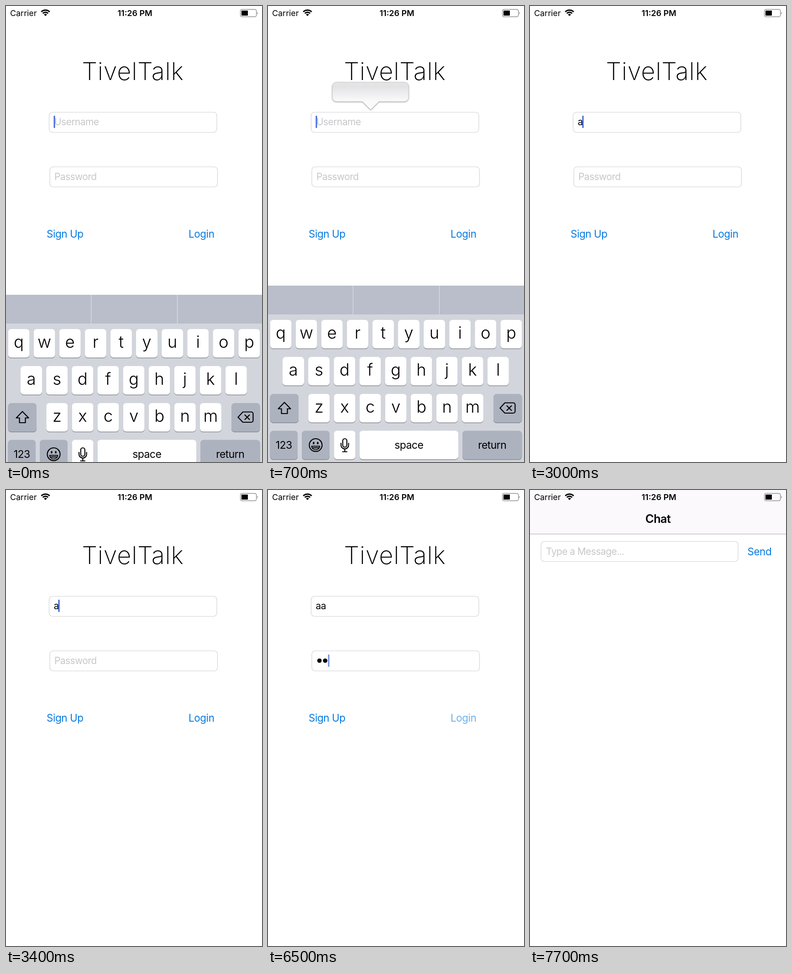
Animation, 561 px wide and 998 px high, one loop 8000 ms. Source, as an HTML page:

```html
<!DOCTYPE html>
<html lang="en">
<head>
<meta charset="utf-8">
<title>Login to chat</title>
<style>
  html, body { margin: 0; width: 100%; height: 100%; overflow: hidden; background: #fff; }
  svg { display: block; width: 561px; height: 998px; }
  text { font: 20.9px Inter, "Open Sans", sans-serif; letter-spacing: -.025em; }
  .mid { text-anchor: middle; }
  .hint { fill: #c7c7cb; }
  .link { font-size: 22.4px; letter-spacing: -.018em; fill: #0579e0; }
  .field { fill: #fff; stroke: #d2d2d4; stroke-width: 1.2; }
  .status { font-size: 17.9px; letter-spacing: 0; }
  .letter { font-size: 36.5px; font-weight: 300; letter-spacing: 0; }
  .label { font-size: 23px; }
  .icon { fill: none; stroke: #000; stroke-width: 2.2; stroke-linejoin: round; stroke-linecap: round; }
</style>
</head>
<body>
<svg viewBox="0 0 561 998">
  <defs>
    <linearGradient id="shade" x2="0" y2="1">
      <stop stop-color="#e6e6e8"/><stop offset=".15" stop-color="#e3e3e6"/><stop offset=".7" stop-color="#fafafa"/>
    </linearGradient>
    <filter id="drop" x="-10%" y="-20%" width="120%" height="150%">
      <feDropShadow dx="0" dy="1" stdDeviation="1.5" flood-opacity=".4"/>
    </filter>
  </defs>

  <text class="mid" x="278" y="162" style="font-size:54px;font-weight:200;letter-spacing:.015em">TivelTalk</text>
  <rect class="field" x="94.5" y="232.5" width="367.5" height="44" rx="7.5"/>
  <rect class="field" x="96" y="352" width="367.5" height="44" rx="7.5"/>
  <text id="userHint" class="hint" x="106" y="261">Username</text>
  <text id="user" x="104.5" y="261"></text>
  <text id="passHint" class="hint" x="106" y="381">Password</text>
  <circle id="dot0" cx="112.7" cy="373.5" r="4.8"/>
  <circle id="dot1" cx="125.3" cy="373.5" r="4.8"/>
  <text id="pass" x="119" y="381">a</text>
  <rect id="caret" width="3" height="27" rx="1" fill="#4169d8"/>
  <text class="link" x="89" y="507">Sign Up</text>
  <text id="login" class="link" x="400" y="507">Login</text>

  <path id="bubble" filter="url(#drop)" fill="url(#shade)" stroke="#bbb" stroke-width=".8"
    d="M150 167H299a9 9 0 0 1 9 9V200a9 9 0 0 1-9 9H243L225 227 207 209H150a9 9 0 0 1-9-9V176a9 9 0 0 1 9-9Z"/>

  <g id="keyboard">
    <rect y="612" width="561" height="400" fill="#d2d5dc"/>
    <rect y="612" width="561" height="63" fill="#babeca"/>
    <path d="M186.5 612v63M375.5 612v63" stroke="#d8dae1" stroke-width="1.4"/>
    <g id="keys"></g>
    <g class="icon">
      <path d="M36 867.5 49.5 881.5H42.5V892H29.5V881.5H22.5Z"/>
      <path d="M519 868.5H537.5a4 4 0 0 1 4 4V887a4 4 0 0 1-4 4H519L508.5 880ZM523.5 875l10 10m0-10-10 10"/>
      <circle cx="104.5" cy="961" r="14"/>
      <path d="M95.5 963.5H113.5C112.5 974 96.5 974 95.5 963.5ZM97.5 967H111.5" stroke-width="1.8"/>
      <rect x="163.8" y="947" width="9" height="18.5" rx="4.5"/>
      <path d="M160 957v4a8.3 8.3 0 0 0 16.6 0v-4M168.3 969.5V975M163.5 975.5H173"/>
    </g>
    <ellipse cx="100" cy="956.5" rx="1.8" ry="2.8"/>
    <ellipse cx="109" cy="956.5" rx="1.8" ry="2.8"/>
  </g>

  <g id="chat">
    <rect width="561" height="1000" fill="#fff"/>
    <rect width="561" height="96" fill="#fbf9fc"/>
    <path d="M0 96.3H561" stroke="#b8b7b9" stroke-width="1.3"/>
    <text class="mid" x="280.5" y="72" style="font-size:25.4px;font-weight:600">Chat</text>
    <rect class="field" x="24" y="112.5" width="432" height="44" rx="7.5"/>
    <text class="hint" x="35" y="142">Type a Message...</text>
    <text class="link" x="476.5" y="143">Send</text>
  </g>

  <text class="status" x="9" y="22">Carrier</text>
  <text class="status mid" x="282.5" y="22" style="font-weight:600">11:26 PM</text>
  <path d="M77.3 12.8A13 13 0 0 1 95.7 12.8M80.7 16.2A8.2 8.2 0 0 1 92.3 16.2" fill="none" stroke="#000" stroke-width="3"/>
  <path d="M86.5 22 83.2 18.7A4.7 4.7 0 0 1 89.8 18.7Z"/>
  <rect x="513.7" y="7.5" width="35" height="16" rx="3.5" fill="none" stroke="#8e8e90" stroke-width="1.4"/>
  <rect x="516" y="10" width="14" height="11" rx="1"/>
  <path d="M550.5 12.5q3 3 0 6Z" fill="#8e8e90"/>
</svg>
<script>
  const $ = id => document.getElementById(id);
  const clamp = v => Math.max(0, Math.min(1, v));
  const LOOP = 8000;

  // Keys
  function key(x, y, w, label, cls, fill = '#fff') {
    const box = (dy, color) =>
      `<rect x="${x}" y="${y + dy}" width="${w}" height="62.5" rx="7" fill="${color}"/>`;
    const baseline = y + (cls === 'letter' ? 41 : 39.5);
    $('keys').innerHTML += box(1.5, '#898c93') + box(0, fill) +
      `<text class="mid ${cls}" x="${x + w / 2}" y="${baseline}">${label}</text>`;
  }
  const GREY = '#adb2bf';
  [['qwertyuiop', 4.5, 687], ['asdfghjkl', 32, 768], ['zxcvbnm', 88.3, 849]].forEach(([row, x, y]) =>
    [...row].forEach((c, i) => key(x + i * 56.1, y, 47, c, 'letter')));
  key(4.5, 849, 62.5, '', 'label', GREY);
  key(494, 849, 62.5, '', 'label', GREY);
  key(4.5, 929.5, 60.5, '123', 'label', GREY);
  key(74, 929.5, 61, '', 'label', GREY);
  key(144.5, 929.5, 47, '', 'label');
  key(200.5, 929.5, 216.5, 'space', 'label');
  key(426, 929.5, 130.5, 'return', 'label', GREY);

  // Remaining distance of a critically damped spring after ms
  function spring(ms) {
    const x = Math.max(0, ms) * .01826;
    return (1 + x) * Math.exp(-x);
  }

  // start, user name, password ("*" is a dot), caret x, caret y, caret blink start
  const steps = [
    [0, '', '', 104.5, 240, 250],
    [3000, 'a', '', 114.5, 240, 3000],
    [3800, 'aa', '', 126, 240, 3800],
    [4300, 'aa', '', 105.5, 360, 4300],
    [4600, 'aa', 'a', 117.5, 360, 4600],
    [4800, 'aa', '*a', 128.8, 360, 4850],
    [6000, 'aa', '**', 131.5, 360, 6000]
  ];

  function caretAlpha(ms) {
    const phase = Math.max(0, ms) % 1000;
    if (ms < 450) return 1;
    return phase < 700 ? 1 - clamp((phase - 450) / 200) : clamp((phase - 800) / 150);
  }

  const show = (id, alpha) => $(id).setAttribute('opacity', +alpha);
  const moveY = (id, y) => $(id).setAttribute('transform', `translate(0 ${y.toFixed(2)})`);

  function draw(t) {
    const [, user, pass, x, y, blinkStart] = steps.filter(s => s[0] <= t).pop();
    $('user').textContent = user;
    show('userHint', !user);
    show('passHint', !pass);
    show('dot0', pass[0] === '*');
    show('dot1', pass[1] === '*');
    show('pass', pass.includes('a'));
    $('pass').setAttribute('x', pass === 'a' ? 106.5 : 119);
    $('caret').setAttribute('x', x);
    $('caret').setAttribute('y', y);
    show('caret', caretAlpha(t - blinkStart));

    show('bubble', t < 700 ? 0 : 1 - clamp((t - 700) / 200));
    show('login', t < 6200 ? 1 : .25 + .75 * clamp((t - 6300) / 450));

    const rise = t < 200 ? 20 : 20 * spring(t - 120);
    moveY('keyboard', t < 2580 ? rise : 400 * (1 - spring(t - 2580)));
    moveY('chat', t < 7700 ? 998 * spring(t - 7177) : 0);
    show('chat', t > 7177);
  }

  function tick() {
    draw(performance.now() % LOOP);
    requestAnimationFrame(tick);
  }
  tick();
</script>
</body>
</html>
```
